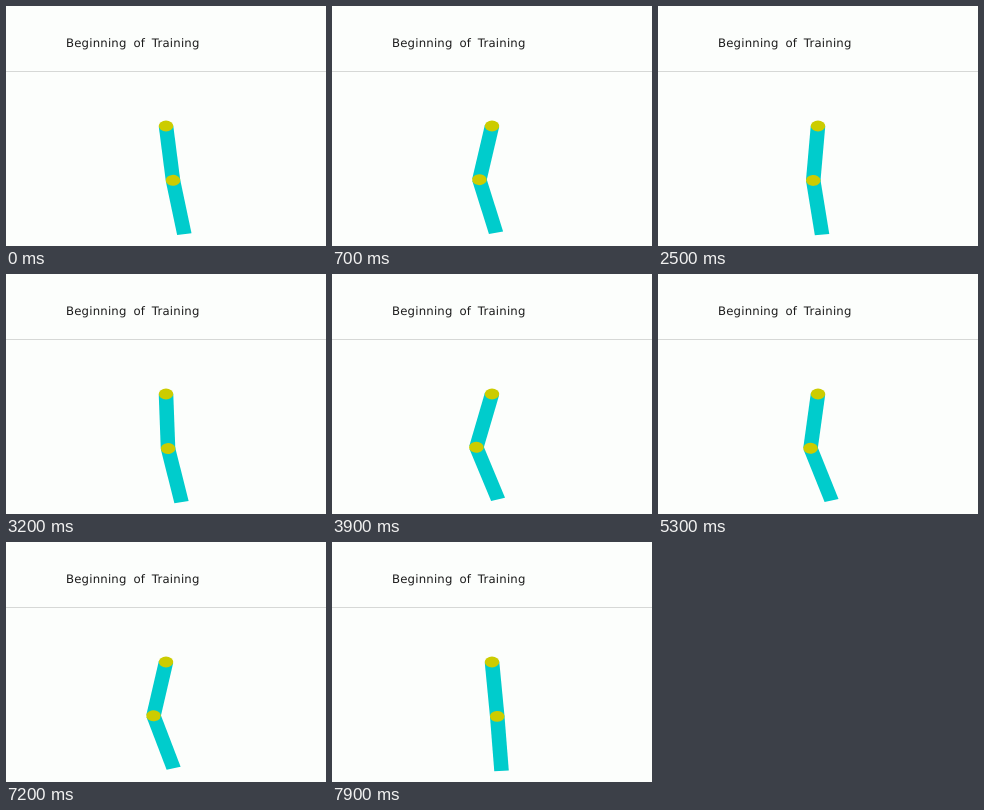
Recreate the animation shown at these times as an HTML page. Size 320 by 240 pixels, loop 8000 ms.

```html
<!DOCTYPE html>
<html lang="en">
<head>
<meta charset="utf-8">
<title>Double pendulum</title>
<style>
  html, body { margin: 0; width: 100%; height: 100%; overflow: hidden; background: #fcfefc; }
  svg { display: block; width: 100vw; height: 100vh; }
  text {
    font: 11.7px "DejaVu Sans", sans-serif;
    letter-spacing: .2px;
    word-spacing: 2.9px;
    text-rendering: geometricPrecision;
    fill: #1c1c1c;
  }
  .link { fill: #00cccc; }
  .joint { fill: #cccc00; }
</style>
</head>
<body>
<svg viewBox="0 0 320 240">
  <text x="60" y="41">Beginning of Training</text>
  <rect y="65" width="320" height="1" fill="#d6d8d6"/>
  <!-- World units: each link is 1 long and 0.2 wide -->
  <g transform="translate(160 120) scale(72.73 54.55)">
    <g id="upper"><rect class="link" x="-.1" width=".2" height="1"/></g>
    <circle class="joint" r=".1"/>
    <g id="lower">
      <rect class="link" x="-.1" width=".2" height="1"/>
      <circle class="joint" r=".1"/>
    </g>
  </g>
</svg>
<script>
  const LOOP = 8000, STEP = 100;
  const upper = document.getElementById("upper");
  const lower = document.getElementById("lower");
  const deg = a => -a * 180 / Math.PI;

  // Two normal modes of a double pendulum under a constant elbow torque
  function pose(t) {
    const slow = 0.033 + 0.0188 * Math.cos(3.766 * t - 0.325);
    const fast = -0.101 + 0.148 * Math.cos(5.54 * t + 0.15);
    return [slow + fast, 3.79 * slow - 0.79 * fast];
  }

  function draw() {
    const ms = performance.now() % LOOP;
    const [a, b] = pose(Math.floor(ms / STEP) * STEP / 1000);
    upper.setAttribute("transform", `rotate(${deg(a)})`);
    lower.setAttribute("transform",
      `translate(${Math.sin(a)} ${Math.cos(a)}) rotate(${deg(b)})`);
    requestAnimationFrame(draw);
  }
  draw();
</script>
</body>
</html>
```
